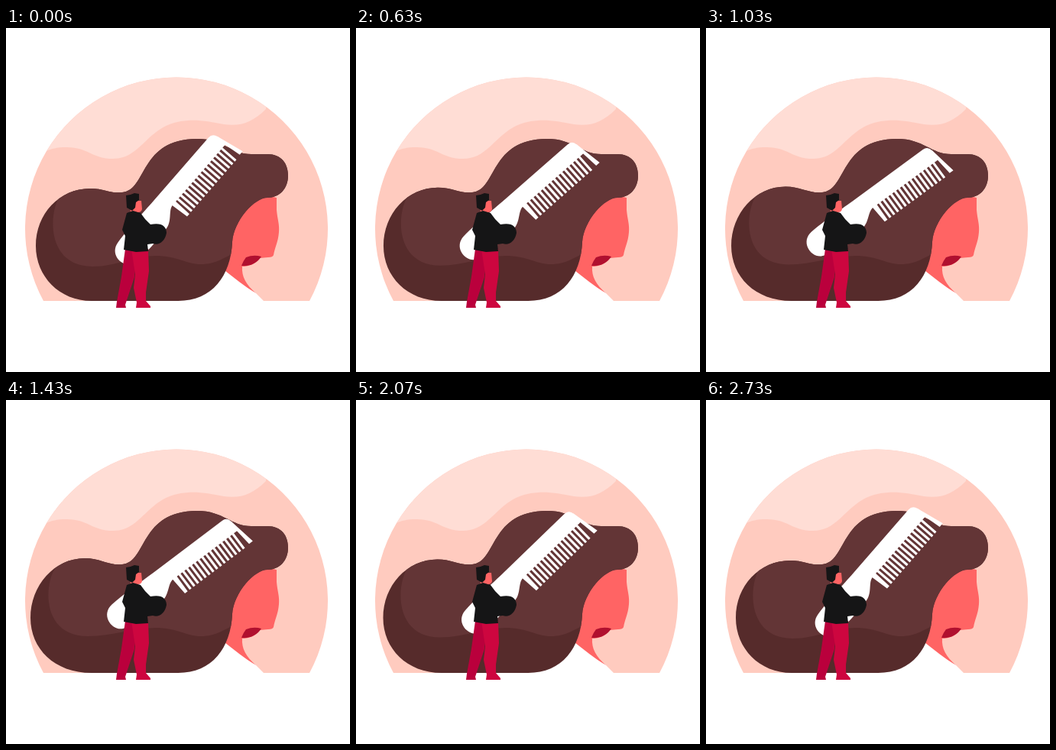
An HTML page for the animation above (2760 ms loop, 450 by 450 pixels).

```html
<!DOCTYPE html>
<html lang="en">
<head>
<meta charset="utf-8">
<title>Combing</title>
<style>
  html, body { margin: 0; width: 100%; height: 100%; overflow: hidden; background: #fff; }
  svg { display: block; width: 100%; height: 100%; }
</style>
</head>
<body>
<svg viewBox="0 0 450 450">
  <defs>
    <clipPath id="disc"><path d="M49 357A198 198 0 1 1 397 357Z"/></clipPath>
    <clipPath id="hairClip"><path class="hair"/></clipPath>
  </defs>

  <g clip-path="url(#disc)">
    <rect width="450" height="450" fill="#ffcbbf"/>
    <path fill="#ffddd5" d="M0 60H340V106C322 124 306 129 285 126C268 123 255 120 238 121C184 124 180 171 140 171C112 171 106 155 78 156C66 156 60 158 52 161H0Z"/>
  </g>

  <path fill="#fff" d="M287 318L325 345L338 358H225Z"/>
  <path fill="#ff6464" d="M354 222L354 238C355 250 358 257 357 267C356 280 352 286 350 297Q349 300 343 300L332 301C327 308 319 312 309 312C308 325 314 336 327 347C312 338 299 327 286 317L280 240L320 215Z"/>
  <path fill="#b0102f" d="M314 300Q324 296 334 299C329 307 320 312 308 311Q310 305 314 300Z"/>

  <path class="hair" fill="#562b2b"/>
  <path id="light" fill="#633536" clip-path="url(#hairClip)"/>

  <g id="comb" fill="#fff">
    <path d="M-72 -15C-40 -17 -25 -15.5 0 -15.5H109Q117 -15.5 118 -7L119 7H11C2 8 -5 21 -18 21C-38 23 -60 21 -76 20C-93 17 -94 -13 -72 -15Z"/>
    <path id="teeth" stroke="#fff" stroke-width="3.2" fill="none"/>
    <path d="M11 5L18 6L17.5 31H13ZM115 -6L118 -8L125 30H119Z"/>
  </g>

  <g id="man">
    <path fill="#ff6464" d="M164 226H177L178 237Q177 241 173 241V246H162Z"/>
    <path fill="#151516" d="M157 219Q162 219 168 216L174 217L174 225L170 228L169 235L165 239L158 235Z"/>
    <path fill="#ba003c" d="M156 289H172L168 326L156 362L157 366H144L145 358L151 325Z"/>
    <path fill="#cd063f" d="M164 289H186L187 318L183 346L183 357L189 364V366H170L171 359L167 340L169 322Z"/>
    <path fill="#151516" d="M158 242L166 239L176 242L182 250L189 257C203 254 210 259 210 268C208 279 200 285 192 282L185 283L186 292L170 293L154 290L156 272L152 264Z"/>
  </g>
</svg>
<script>
  const LOOP = 2760, PEAK = 1130;
  const find = id => document.getElementById(id);
  const hairs = document.querySelectorAll('.hair');
  const wave = x => (1 - Math.cos(Math.PI * x)) / 2;

  find('teeth').setAttribute('d',
    Array.from({ length: 15 }, (_, i) => `M${22.3 + i * 6.25} 5V31`).join(''));

  function hairPath(k) {
    const x = 39 - 7 * k, y = 210 - 3 * k;
    return `M112 357C${x + 31} 357 ${x} 325 ${x} 285C${x} 243 ${x + 31} ${y} ${x + 71} ${y}` +
      `C${x + 91} ${y} 136 217 152 215C185 212 174 145 250 145C285 145 294 165 321 165H342` +
      'C360 165 369 177 369 193C369 210 358 222 342 222C325 222 298 252 296 280' +
      'C294 324 270 357 225 357Z';
  }

  function lightPath(k) {
    const x = 60 - 6 * k, y = 312 - 3 * k;
    return `M${x + 12} 217C${x - 5} 240 ${x - 8} ${y} ${x + 53} ${y}` +
      `C${x + 85} ${y} 167 298 195 298C225 298 235 309 255 309C275 309 285 300 296 296` +
      'L400 240V130H70Z';
  }

  function draw(t) {
    const swing = t < PEAK ? wave(t / PEAK) : wave((LOOP - t) / (LOOP - PEAK));
    find('comb').setAttribute('transform', `translate(205 236) rotate(${-49 + 13 * swing})`);

    const swell = wave(2 * t / LOOP);
    hairs.forEach(h => h.setAttribute('d', hairPath(swell)));
    find('light').setAttribute('d', lightPath(swell));
  }

  const start = performance.now();
  function frame() {
    draw((performance.now() - start) % LOOP);
    requestAnimationFrame(frame);
  }
  frame();
</script>
</body>
</html>
```
